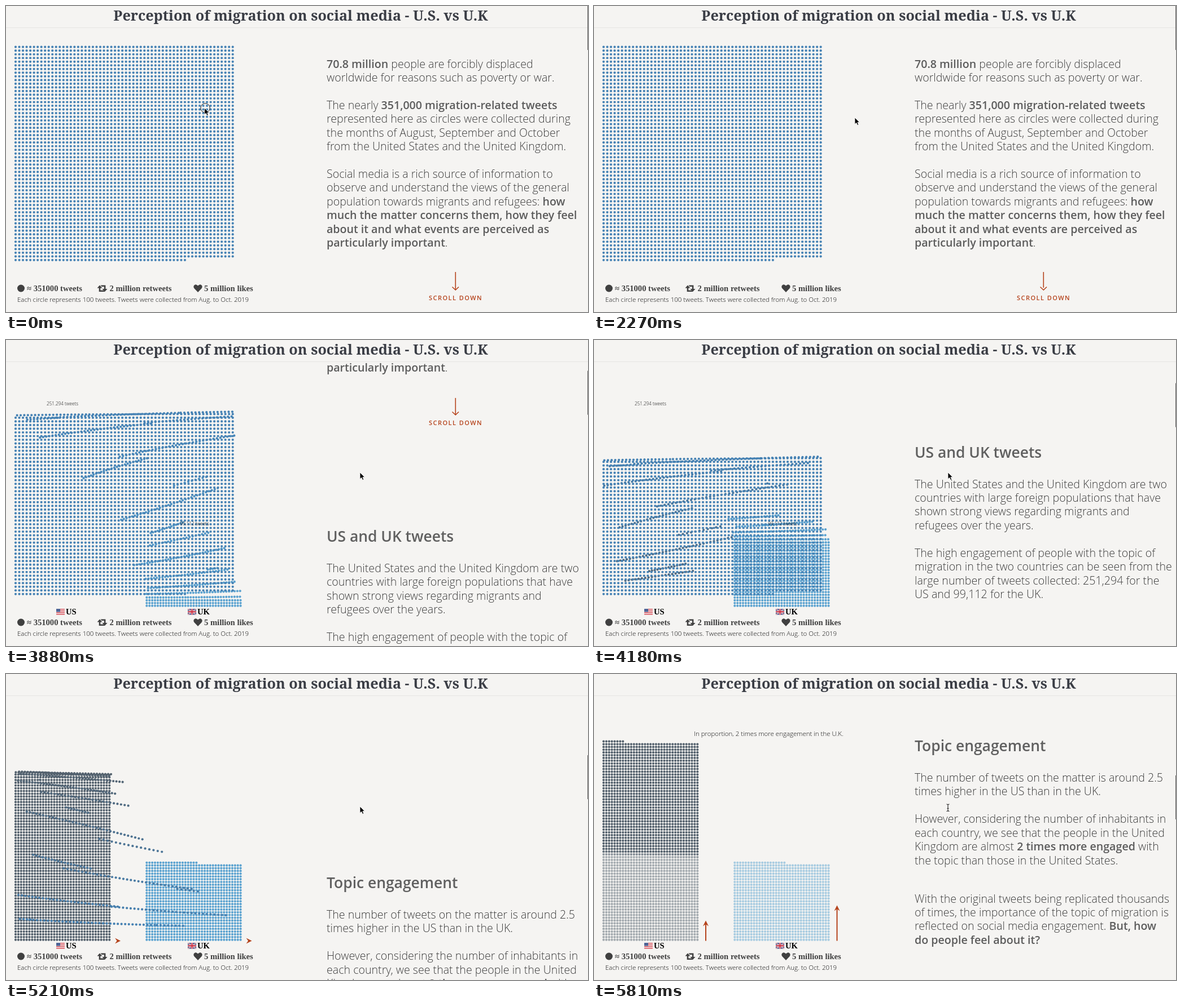
Animation, 1031 px wide and 543 px high, one loop 5.91 s. Source, as an HTML page with a canvas:

```html
<!DOCTYPE html>
<html lang="en">
<head>
<meta charset="utf-8">
<title>Perception of migration</title>
<style>
  html, body { margin: 0; width: 100%; height: 100%; overflow: hidden; background: #f5f4f2; }
  canvas, svg { position: absolute; left: 0; top: 0; width: 1031px; height: 543px; }
  text { font-family: "Open Sans", sans-serif; font-weight: 300; white-space: pre; }
  .title { font: bold 25.2px "Noto Serif", Georgia, serif; fill: #3a3d45; }
  .body { font-size: 19.63px; fill: #3e3e3e; }
  .body tspan { font-weight: 600; fill: #5c5c5c; }
  .head { font-size: 26.4px; font-weight: 600; fill: #606060; }
  .stat { font: bold 14.6px "Liberation Serif", Times, serif; fill: #404040; }
  .note { font-size: 11.48px; fill: #111; }
  .count { font-size: 8.15px; fill: #111; }
  .cue { font-size: 11px; font-weight: 600; letter-spacing: 1.45px; fill: #b5431c; }
</style>
</head>
<body>
<canvas id="dots" width="1031" height="543"></canvas>
<svg id="stage" viewBox="0 0 1031 543">
  <g id="page">
    <g fill="none" stroke="#b5431c" stroke-width="1.6">
      <path id="cueLine"/>
      <path d="M790.5 498.5L796.3 504L802 498.5"/>
    </g>
    <text class="cue" x="749" y="522">SCROLL DOWN</text>
  </g>

  <rect width="1031" height="38" fill="#f5f4f2"/>
  <path d="M0 38.5H1031" stroke="#e6e4e2"/>
  <text class="title" x="522" y="26" text-anchor="middle">Perception of migration on social media - U.S. vs U.K</text>
  <rect id="thumb" x="1030" width="1" height="78" fill="#606060"/>

  <g fill="#404040">
    <circle cx="26.5" cy="501" r="6.5"/>
    <path d="M166 495.5L170.5 500.5H167.3V504.5H173L175 507H164.7V500.5H161.5ZM175 507L179.6 502H176.4V495.5H167.5L169.6 498H173.8V502H170.5Z"/>
    <path d="M340 508L333.8 501.6C330.5 498 333.5 493.8 336.8 494.4Q338.8 494.8 340 496.6Q341.2 494.8 343.2 494.4C346.5 493.8 349.5 498 346.2 501.6Z"/>
  </g>
  <text class="stat" x="37" y="506">≈ 351000 tweets</text>
  <text class="stat" x="183.5" y="506">2 million retweets</text>
  <text class="stat" x="351" y="506">5 million likes</text>
  <text class="note" x="20" y="524.5">Each circle represents 100 tweets. Tweets were collected from Aug. to Oct. 2019</text>

  <g id="countries">
    <g transform="translate(89 477)">
      <rect width="15" height="10.5" fill="#f3eeee"/>
      <path d="M0 .8H15M0 3.8H15M0 6.8H15M0 9.8H15" stroke="#d9505a" stroke-width="1.5"/>
      <rect width="7" height="5.5" fill="#4d6496"/>
    </g>
    <g transform="translate(322 477)" fill="none">
      <rect width="15" height="10.5" fill="#2c4583"/>
      <path d="M0 0L15 10.5M15 0L0 10.5" stroke="#eee" stroke-width="2"/>
      <path d="M7.5 0V10.5M0 5.25H15" stroke="#eee" stroke-width="3.6"/>
      <path d="M0 0L15 10.5M15 0L0 10.5" stroke="#cf3344" stroke-width=".7"/>
      <path d="M7.5 0V10.5M0 5.25H15" stroke="#cf3344" stroke-width="2"/>
    </g>
    <text class="stat" x="106" y="487" style="fill:#000">US</text>
    <text class="stat" x="339" y="487" style="fill:#000">UK</text>
  </g>
  <g id="counts" text-anchor="middle">
    <text class="count" x="100" y="115.5">251.294 tweets</text>
    <text class="count" x="334" y="329">99.112 tweets</text>
  </g>
  <text id="caption" class="note" x="177" y="109.5">In proportion, 2 times more engagement in the U.K.</text>

  <g id="arrows" fill="#b5431c" stroke="#b5431c">
    <path class="shaft" stroke-width="2"/><path class="tip" stroke="none" d="M-5-5L5 0L-5 5L-1.5 0Z"/>
    <path class="shaft" stroke-width="2"/><path class="tip" stroke="none" d="M-5-5L5 0L-5 5L-1.5 0Z"/>
  </g>

  <g id="pointer">
    <circle id="ring" cx="1.5" r="8.2" fill="none" stroke="#222"/>
    <path id="arrow" d="M0 0V11.7L2.7 9.2L4.7 13.5L6.7 12.6L4.9 8.4H8.5Z" stroke="#fff" stroke-width=".8"/>
    <path id="beam" d="M-2.5-4Q0-4 0-2.5Q0-4 2.5-4M0-2.5V7M-1.5 3.5H1.5M-2.5 8.5Q0 8.5 0 7Q0 8.5 2.5 8.5" fill="none" stroke="#222" stroke-width="1.1"/>
  </g>
</svg>
<script>
const $ = id => document.getElementById(id);
const clamp = v => Math.max(0, Math.min(1, v));
const mix = (a, b, p) => a + (b - a) * p;
const show = (id, on) => $(id).style.display = on ? '' : 'none';

// Piecewise linear curve through [x, y] points.
function along(points, x) {
  if (x <= points[0][0]) return points[0][1];
  for (let i = 1; i < points.length; i++) {
    const [x0, y0] = points[i - 1], [x1, y1] = points[i];
    if (x <= x1) return mix(y0, y1, (x - x0) / (x1 - x0));
  }
  return points[points.length - 1][1];
}

const LOOP = 5910;
// The screen refreshes in about 40 uneven ticks per loop.
const TICKS = [[0, 0], [150, 1], [1080, 7], [1230, 8], [2270, 15], [2410, 16], [3440, 23], [3590, 24],
  [3880, 26], [4620, 31], [4770, 32], [5210, 35], [5810, 39], [5910, 40]];
const SCROLL = [[20.5, 0], [22, 14.7], [26, 371], [31, 744.5], [35, 979], [39, 1222]];
const LAUNCHED = [[24.35, 0], [26, 607], [31, 2450], [35, 3601], [37, 4200]];
const POINTER_X = [[0, 351.5], [7, 339], [9, 345], [15, 462], [20, 627]];
const POINTER_Y = [[0, 181], [7, 185], [9, 187], [15, 198], [20, 235]];

// Text column
const LINE = 24.42;
function addText(cls, y, source) {
  const el = document.createElementNS('http://www.w3.org/2000/svg', 'text');
  el.setAttribute('class', cls);
  el.setAttribute('x', 568);
  el.setAttribute('y', y);
  el.innerHTML = source.replace(/\*(.+?)\*/g, '<tspan>$1</tspan>');
  $('page').append(el);
}
const addLines = (y, source) => source.split('|').forEach((s, i) => s && addText('body', y + i * LINE, s));

addLines(109.7, '*70.8 million* people are forcibly displaced|worldwide for reasons such as poverty or war.||' +
  'The nearly *351,000 migration-related tweets*|represented here as circles were collected during|' +
  'the months of August, September and October|from the United States and the United Kingdom.||' +
  'Social media is a rich source of information to|observe and understand the views of the general|' +
  'population towards migrants and refugees: *how*|*much the matter concerns them, how they feel*|' +
  '*about it and what events are perceived as*|*particularly important*.');
addText('head', 729, 'US and UK tweets');
addLines(783, 'The United States and the United Kingdom are two|countries with large foreign populations that have|' +
  'shown strong views regarding migrants and|refugees over the years.||' +
  'The high engagement of people with the topic of|migration in the two countries can be seen from the|' +
  'large number of tweets collected: 251,294 for the|US and 99,112 for the UK.');
addText('head', 1358.5, 'Topic engagement');
addLines(1413, 'The number of tweets on the matter is around 2.5|times higher in the US than in the UK.||' +
  'However, considering the number of inhabitants in|each country, we see that the people in the United|' +
  'Kingdom are almost *2 times more engaged* with|the topic than those in the United States.');
addLines(1627.5, 'With the original tweets being replicated thousands|of times, the importance of the topic of migration is|' +
  'reflected on social media engagement. *But, how*|*do people feel about it?*');

// Dots: one wide grid that regroups into two stacks filled from the bottom.
const TOTAL = 3527, UK_COUNT = 999, FLIGHT = 520;
const UNIT = .815, WIDE = 8 * UNIT, TIGHT = 6 * UNIT;
const BLUE = [70, 130, 180], UK_BLUE = [92, 163, 208], US_SLATE = [84, 97, 109];
const dots = Array.from({ length: TOTAL }, (_, i) => {
  const uk = i < UK_COUNT, j = uk ? i : i - UK_COUNT;
  return {
    x0: 17 + i % 60 * WIDE, y0: 72.7 + Math.floor(i / 60) * WIDE,
    x1: (uk ? 249.3 : 17) + j % 35 * TIGHT, y1: 471.7 - Math.floor(j / 35) * TIGHT,
    color: uk ? UK_BLUE : US_SLATE
  };
});
const easeCubic = u => u < .5 ? 4 * u ** 3 : 1 - 4 * (1 - u) ** 3;
const ctx = $('dots').getContext('2d');

function drawDots(tick) {
  const launched = along(LAUNCHED, tick), faded = (tick - 35.5) * 610;
  ctx.clearRect(0, 0, 1031, 543);
  dots.forEach((d, i) => {
    const p = easeCubic(clamp((launched - i) / FLIGHT));
    const rgb = BLUE.map((c, n) => Math.round(mix(c, d.color[n], p)));
    ctx.globalAlpha = 1 - .5 * clamp((faded - i) / 70);
    ctx.fillStyle = `rgb(${rgb})`;
    ctx.beginPath();
    ctx.arc(mix(d.x0, d.x1, p), mix(d.y0, d.y1, p), 2.1, 0, 7);
    ctx.fill();
  });
}

// cubic-bezier(1, 0, 0, 1)
function easeSnap(u) {
  let lo = 0, hi = 1;
  for (let n = 0; n < 20; n++) {
    const s = (lo + hi) / 2;
    if (3 * (1 - s) ** 2 * s + s ** 3 < u) lo = s; else hi = s;
  }
  return 3 * (1 - lo) * lo * lo + lo ** 3;
}

function drawCue(tick) {
  const phase = ((tick - 22) / 8.1 + 10.17) % 1;
  const top = phase < .5 ? 0 : easeSnap(phase * 2 - 1);
  const bottom = phase < .5 ? easeSnap(phase * 2) : 1;
  $('cueLine').setAttribute('d', `M796.3 ${472 + 31 * top}V${472 + 31 * bottom}`);
}

function drawArrows(tick) {
  const grow = clamp((tick - 35) / 4);
  const shafts = document.querySelectorAll('.shaft'), tips = document.querySelectorAll('.tip');
  [[198, 31], [430.5, 58]].forEach(([x, height], n) => {
    const y = 473.5 - height * grow;
    shafts[n].setAttribute('d', `M${x} 473.5V${y}`);
    tips[n].setAttribute('transform', `translate(${x} ${y}) rotate(${grow ? -90 : 0})`);
  });
}

function drawPointer(tick) {
  const x = along(POINTER_X, tick), y = along(POINTER_Y, tick);
  const overText = x > 568 && tick < 24 || tick > 37;
  $('pointer').setAttribute('transform', `translate(${x} ${y})`);
  show('ring', x < 405);
  show('arrow', !overText);
  show('beam', overText);
}

function draw(tick) {
  const scroll = along(SCROLL, tick);
  $('page').setAttribute('transform', `translate(0 ${-scroll})`);
  $('thumb').setAttribute('y', scroll * .1472);
  show('countries', tick >= 25);
  show('counts', tick >= 25 && tick < 33);
  show('arrows', tick >= 33);
  show('caption', tick >= 37);
  drawDots(tick);
  drawCue(tick);
  drawArrows(tick);
  drawPointer(tick);
}

let lastTick = -1;
const start = performance.now();
function loop() {
  const time = (performance.now() - start) % LOOP;
  const tick = Math.min(39, Math.floor(along(TICKS, time) + .04));
  if (tick !== lastTick) draw(lastTick = tick);
  requestAnimationFrame(loop);
}
loop();
</script>
</body>
</html>
```
